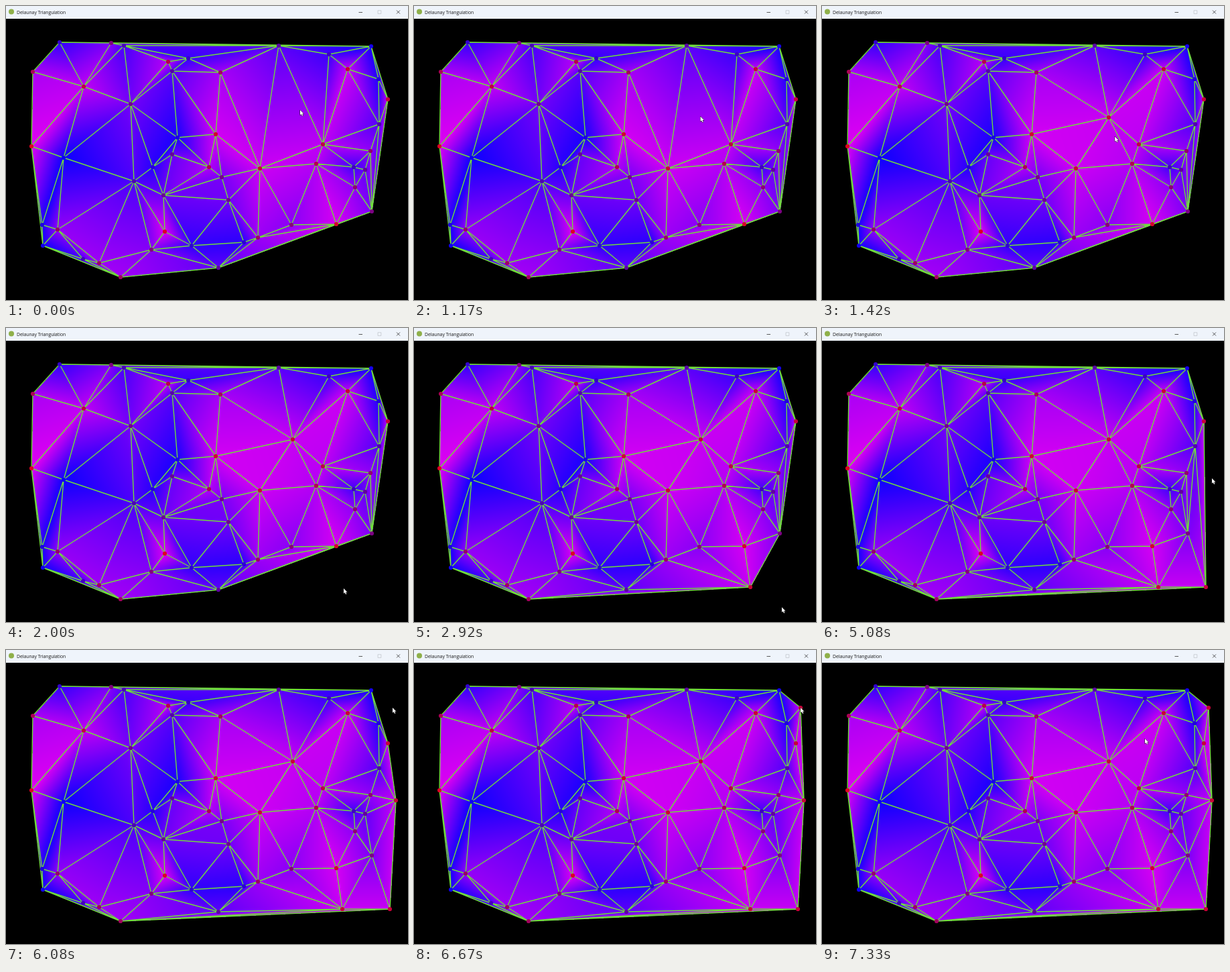
Recreate the animation shown at these times as an HTML page with a canvas. Size 600 by 438 pixels, loop 8 s.

```html
<!DOCTYPE html>
<html lang="en">
<head>
<meta charset="utf-8">
<title>Delaunay Triangulation</title>
<style>
  html, body { margin: 0; height: 100%; overflow: hidden; background: #000; }
  canvas { display: block; }
</style>
</head>
<body>
<canvas id="stage" width="600" height="438"></canvas>
<script>
const W = 600, H = 438, LOOP = 8000, STEP = 1000 / 12, GLIDE = 500;
const ctx = document.getElementById('stage').getContext('2d');

// Key points from coldest (blue) to hottest (red); heat follows from the order.
const sites = [
  [86, 226], [55, 357], [545, 60], [256, 196], [54, 326], [556, 109], [219, 240],
  [355, 352], [277, 357], [80, 54], [272, 78], [482, 72], [519, 240], [115, 377],
  [176, 59], [191, 261], [557, 176], [248, 97], [407, 59], [317, 390], [536, 244],
  [248, 221], [235, 282], [332, 289], [186, 146], [322, 255], [546, 306], [157, 55],
  [217, 363], [426, 326], [521, 270], [544, 216], [77, 333], [376, 345], [139, 383],
  [171, 404], [320, 99], [40, 98], [303, 240], [463, 235], [242, 83], [473, 206],
  [116, 120], [570, 139], [510, 94], [379, 242], [313, 191], [493, 325], [237, 336], [38, 209]
];
const points = sites.map(([x, y], rank) => ({ x, y, heat: 0.05 + 0.82 * rank / (sites.length - 1) }));

// Cursor stops: arrival time, x, y. Each click drops a point under the cursor.
const stops = [
  [0, 439, 155], [330, 426, 160], [1330, 428, 166], [1750, 511, 424], [2000, 504, 388],
  [2500, 502, 386], [2920, 549, 416], [3420, 573, 386], [4670, 582, 224],
  [6080, 577, 86], [7330, 482, 132]
];
const clickTimes = [1330, 2500, 4000, 5330, 6580];

function cursorAt(time) {
  const next = stops.findIndex(stop => stop[0] > time);
  if (next < 0) return stops.at(-1).slice(1);
  const [t0, x0, y0] = stops[next - 1], [t1, x1, y1] = stops[next];
  const s = Math.max(0, 1 - (t1 - time) / Math.min(GLIDE, t1 - t0));
  const ease = s * s * (3 - 2 * s);
  return [x0 + (x1 - x0) * ease, y0 + (y1 - y0) * ease];
}

const clicked = clickTimes.map(time => {
  const [x, y] = cursorAt(time);
  return { x, y, heat: 0.78 };
});

const cross = (a, b, c) => (b.x - a.x) * (c.y - a.y) - (b.y - a.y) * (c.x - a.x);

function inCircle(a, b, c, p) {
  const lifted = [a, b, c].map(q => {
    const x = q.x - p.x, y = q.y - p.y;
    return [x, y, x * x + y * y];
  });
  const [[ax, ay, az], [bx, by, bz], [cx, cy, cz]] = lifted;
  return ax * (by * cz - bz * cy) - ay * (bx * cz - bz * cx) + az * (bx * cy - by * cx) > 1e-6;
}

// Keeps every triple whose circumcircle holds no other point.
function delaunay(pts) {
  const triangles = [];
  for (let i = 0; i < pts.length; i++)
    for (let j = i + 1; j < pts.length; j++)
      for (let k = j + 1; k < pts.length; k++) {
        const a = pts[i], area = cross(a, pts[j], pts[k]);
        if (!area) continue;
        const [b, c] = area > 0 ? [pts[j], pts[k]] : [pts[k], pts[j]];
        if (!pts.some(p => p !== a && p !== b && p !== c && inCircle(a, b, c, p)))
          triangles.push([a, b, c]);
      }
  return triangles;
}

// Fills a triangle with the heat blended between its corners.
function shade(image, [a, b, c]) {
  const area = cross(a, b, c);
  const xs = [a.x, b.x, c.x], ys = [a.y, b.y, c.y];
  for (let y = Math.min(...ys); y <= Math.max(...ys); y++)
    for (let x = Math.min(...xs); x <= Math.max(...xs); x++) {
      const p = { x, y };
      const u = cross(b, c, p) / area, v = cross(c, a, p) / area, w = 1 - u - v;
      if (Math.min(u, v, w) < -1e-9) continue;
      const heat = u * a.heat + v * b.heat + w * c.heat;
      image.data.set([255 * heat, 0, 255 - 15 * heat, 255], (y * W + x) * 4);
    }
}

function drawTitleBar(g) {
  g.fillStyle = '#eff4fb';
  g.fillRect(0, 0, W, 19);
  g.fillStyle = '#8fb04a';
  g.beginPath();
  g.arc(8, 8.5, 4, 0, Math.PI * 2);
  g.fill();
  g.fillStyle = '#151515';
  g.font = '6.8px "Open Sans", sans-serif';
  g.fillText('Delaunay Triangulation', 16, 11.5);
  g.lineWidth = 0.8;
  g.strokeStyle = '#333';
  g.stroke(new Path2D('M526.5 9.5h5.5M583 6.5l5 5M588 6.5l-5 5'));
  g.strokeStyle = '#c4c8ce';
  g.strokeRect(555, 6.7, 4.8, 4.8);
}

function renderScene(pts) {
  const canvas = document.createElement('canvas');
  canvas.width = W;
  canvas.height = H;
  const g = canvas.getContext('2d');
  const triangles = delaunay(pts);

  const image = g.createImageData(W, H);
  triangles.forEach(t => shade(image, t));
  g.putImageData(image, 0, 0);
  g.globalCompositeOperation = 'destination-over';
  g.fillRect(0, 0, W, H);
  g.globalCompositeOperation = 'source-over';

  g.beginPath();
  for (const [a, b, c] of triangles) {
    g.moveTo(a.x, a.y);
    g.lineTo(b.x, b.y);
    g.lineTo(c.x, c.y);
    g.closePath();
  }
  g.strokeStyle = '#70dc3c';
  g.lineWidth = 1.4;
  g.lineJoin = 'round';
  g.stroke();

  for (const { x, y, heat } of pts) {
    g.fillStyle = `rgb(${255 * heat}, 0, ${255 * (1 - heat)})`;
    g.beginPath();
    g.arc(x, y, 3.1, 0, Math.PI * 2);
    g.fill();
  }
  drawTitleBar(g);
  return canvas;
}

// One scene before the first click and one after each.
const scenes = [renderScene(points)];
clicked.forEach((_, n) => scenes.push(renderScene([...points, ...clicked.slice(0, n + 1)])));

const arrow = new Path2D('M0 0V7.6L1.8 6L3 8.8L4.3 8.2L3.1 5.6H5.4Z');

function drawCursor(time) {
  ctx.save();
  ctx.translate(...cursorAt(time));
  ctx.strokeStyle = '#111';
  ctx.lineWidth = 1;
  ctx.stroke(arrow);
  ctx.fillStyle = '#fff';
  ctx.fill(arrow);
  ctx.restore();
}

function frame() {
  const now = performance.now() % LOOP;
  const time = Math.floor((now + 4) / STEP) * STEP % LOOP;
  ctx.drawImage(scenes[clickTimes.filter(click => now >= click).length], 0, 0);
  drawCursor(time);
  requestAnimationFrame(frame);
}
frame();
</script>
</body>
</html>
```
